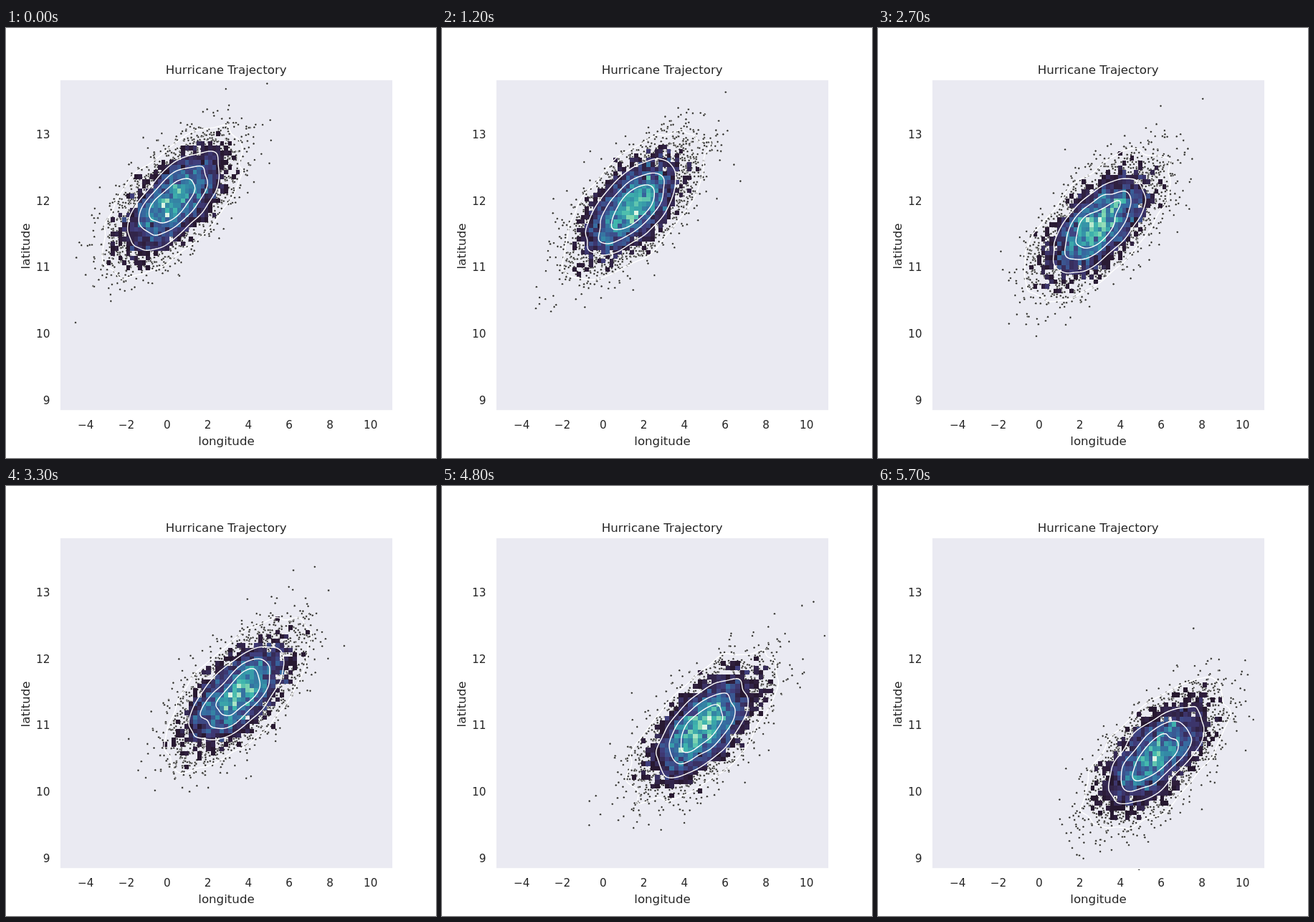
Recreate the animation shown at these times as an HTML page with a canvas. Size 600 px wide and 600 px high, loop 6000 ms.

```html
<!DOCTYPE html>
<html lang="en">
<head>
<meta charset="utf-8">
<title>Hurricane Trajectory</title>
<style>
  html, body { margin: 0; width: 100%; height: 100%; overflow: hidden; background: #fff; }
  canvas, svg { position: absolute; left: 0; top: 0; width: 600px; height: 600px; }
  text { font-family: "DejaVu Sans", sans-serif; font-size: 16.67px; fill: #262626; text-anchor: middle; }
  .tick { font-size: 15.28px; }
  .end { text-anchor: end; }
</style>
</head>
<body>
<canvas id="plot" width="600" height="600"></canvas>
<svg id="axes" viewBox="0 0 600 600">
  <rect x="75" y="72" width="465" height="462" fill="none" stroke="#fff" stroke-width="1.74"/>
  <text x="307.2" y="64">Hurricane Trajectory</text>
  <text x="307.5" y="582">longitude</text>
  <text transform="translate(33 304.5) rotate(-90)">latitude</text>
</svg>
<script>
const STEP = 300, STEPS = 20, POINTS = 5000, BINS = 50;
const GRID = 140, SPAN = 5.6, CELL = 2 * SPAN / GRID;
const MAKO = ['0b0405', '2e1e3b', '413d7b', '37659e', '348fa7', '40b7ad', '8ad9b1', 'def5e5']
  .map(hex => [0, 2, 4].map(i => parseInt(hex.slice(i, i + 2), 16)));

const ctx = document.getElementById('plot').getContext('2d');
const axes = document.getElementById('axes');
const px = lon => 224.8 + 28.4 * lon;
const py = lat => 241 - 92.65 * (lat - 12);

function addTick(x, y, value, cls) {
  const text = document.createElementNS('http://www.w3.org/2000/svg', 'text');
  text.setAttribute('x', x);
  text.setAttribute('y', y);
  text.setAttribute('class', cls);
  text.textContent = String(value).replace('-', '\u2212');
  axes.append(text);
}
for (let lon = -4; lon <= 10; lon += 2) addTick(px(lon), 559.3, lon, 'tick');
for (let lat = 9; lat <= 13; lat++) addTick(61.5, py(lat) + 5.6, lat, 'tick end');

function randomizer(seed) {
  return () => {
    seed = (seed + 0x6d2b79f5) | 0;
    let t = Math.imul(seed ^ (seed >>> 15), 1 | seed);
    t = (t + Math.imul(t ^ (t >>> 7), 61 | t)) ^ t;
    return ((t ^ (t >>> 14)) >>> 0) / 4294967296;
  };
}

function normalPairs(seed) {
  const rnd = randomizer(seed);
  return Array.from({ length: POINTS }, () => {
    const r = Math.sqrt(-2 * Math.log(1 - rnd())), a = 2 * Math.PI * rnd();
    return [r * Math.cos(a), r * Math.sin(a)];
  });
}

// Standard normal pair to stage position: covariance [[2, .4], [.4, .2]]
function placer(step) {
  const lon = 0.29 + 0.287 * step, lat = 12 - 0.0443 * lon * lon;
  return ([u, v]) => [px(lon + 1.4142 * u), py(lat + 0.2828 * u + 0.3464 * v)];
}

function mako(v) {
  const s = v * 7, i = Math.min(6, Math.floor(s)), f = s - i;
  return `rgb(${MAKO[i].map((c, n) => Math.round(c + (MAKO[i + 1][n] - c) * f))})`;
}

// Value below which the given share of the total lies
function massLevel(values, share) {
  const sorted = Float64Array.from(values).sort().reverse();
  const goal = (1 - share) * sorted.reduce((a, b) => a + b, 0);
  let sum = 0;
  return sorted.find(v => (sum += v) >= goal);
}

function drawDots(dots) {
  ctx.fillStyle = '#262626';
  ctx.strokeStyle = '#fff';
  ctx.lineWidth = 0.6;
  for (const [x, y] of dots) {
    ctx.beginPath();
    ctx.arc(x, y, 1.55, 0, 7);
    ctx.fill();
    ctx.stroke();
  }
}

function drawBins(dots) {
  const range = axis => {
    const list = dots.map(d => d[axis]), min = Math.min(...list);
    return [min, (Math.max(...list) - min) / BINS];
  };
  const [x0, w] = range(0), [y0, h] = range(1);
  const counts = new Float64Array(BINS * BINS);
  const index = (v, min, size) => Math.min(BINS - 1, Math.floor((v - min) / size));
  for (const [x, y] of dots) counts[index(y, y0, h) * BINS + index(x, x0, w)]++;
  const floor = massLevel(counts, 0.1), peak = Math.max(...counts);
  counts.forEach((n, i) => {
    if (n <= floor) return;
    const c = i % BINS, r = (i - c) / BINS;
    const x = Math.round(x0 + c * w), y = Math.round(y0 + r * h);
    ctx.fillStyle = mako(n / peak);
    ctx.fillRect(x, y, Math.round(x0 + (c + 1) * w) - x, Math.round(y0 + (r + 1) * h) - y);
  });
}

function blur(src, stride) {
  const sigma = Math.pow(POINTS, -1 / 6) / CELL, reach = Math.ceil(3.5 * sigma);
  const out = new Float64Array(src.length);
  for (let k = -reach; k <= reach; k++) {
    const weight = Math.exp(-k * k / (2 * sigma * sigma));
    for (let i = 0; i < src.length; i++) {
      const pos = (stride === 1 ? i % GRID : Math.floor(i / GRID)) + k;
      if (pos >= 0 && pos < GRID) out[i] += weight * src[i + k * stride];
    }
  }
  return out;
}

function drawContours(pairs, place) {
  let field = new Float64Array(GRID * GRID);
  for (const [u, v] of pairs) {
    const c = Math.floor((u + SPAN) / CELL), r = Math.floor((v + SPAN) / CELL);
    if (Math.min(c, r) >= 0 && Math.max(c, r) < GRID) field[r * GRID + c]++;
  }
  field = blur(blur(field, 1), GRID);
  const corners = [[0, 0], [1, 0], [1, 1], [0, 1]];
  const coord = n => (n + 0.5) * CELL - SPAN;
  ctx.beginPath();
  for (const share of [0.05, 0.2875, 0.525, 0.7625]) {
    const level = massLevel(field, share);
    for (let r = 0; r < GRID - 1; r++) for (let c = 0; c < GRID - 1; c++) {
      const d = corners.map(([i, j]) => field[(r + j) * GRID + c + i] - level);
      const cuts = [];
      for (let e = 0; e < 4; e++) {
        const n = (e + 1) % 4;
        if (d[e] > 0 === d[n] > 0) continue;
        const f = d[e] / (d[e] - d[n]), [ax, ay] = corners[e], [bx, by] = corners[n];
        cuts.push(place([coord(c + ax + (bx - ax) * f), coord(r + ay + (by - ay) * f)]));
      }
      for (let i = 0; i + 1 < cuts.length; i += 2) {
        ctx.moveTo(...cuts[i]);
        ctx.lineTo(...cuts[i + 1]);
      }
    }
  }
  ctx.strokeStyle = '#fff';
  ctx.lineWidth = 1.39;
  ctx.lineCap = 'round';
  ctx.stroke();
}

function draw(step) {
  const pairs = normalPairs(101 + step * 7919), place = placer(step);
  const dots = pairs.map(place);
  ctx.clearRect(0, 0, 600, 600);
  ctx.fillStyle = '#eaeaf2';
  ctx.fillRect(75, 72, 465, 462);
  ctx.save();
  ctx.beginPath();
  ctx.rect(75, 72, 467, 464);
  ctx.clip();
  drawDots(dots);
  drawBins(dots);
  drawContours(pairs, place);
  ctx.restore();
}

let shown = 0;
const start = performance.now();
function tick(now) {
  const step = Math.floor(Math.max(0, now - start) / STEP) % STEPS;
  if (step !== shown) draw(shown = step);
  requestAnimationFrame(tick);
}
draw(0);
requestAnimationFrame(tick);
</script>
</body>
</html>
```
